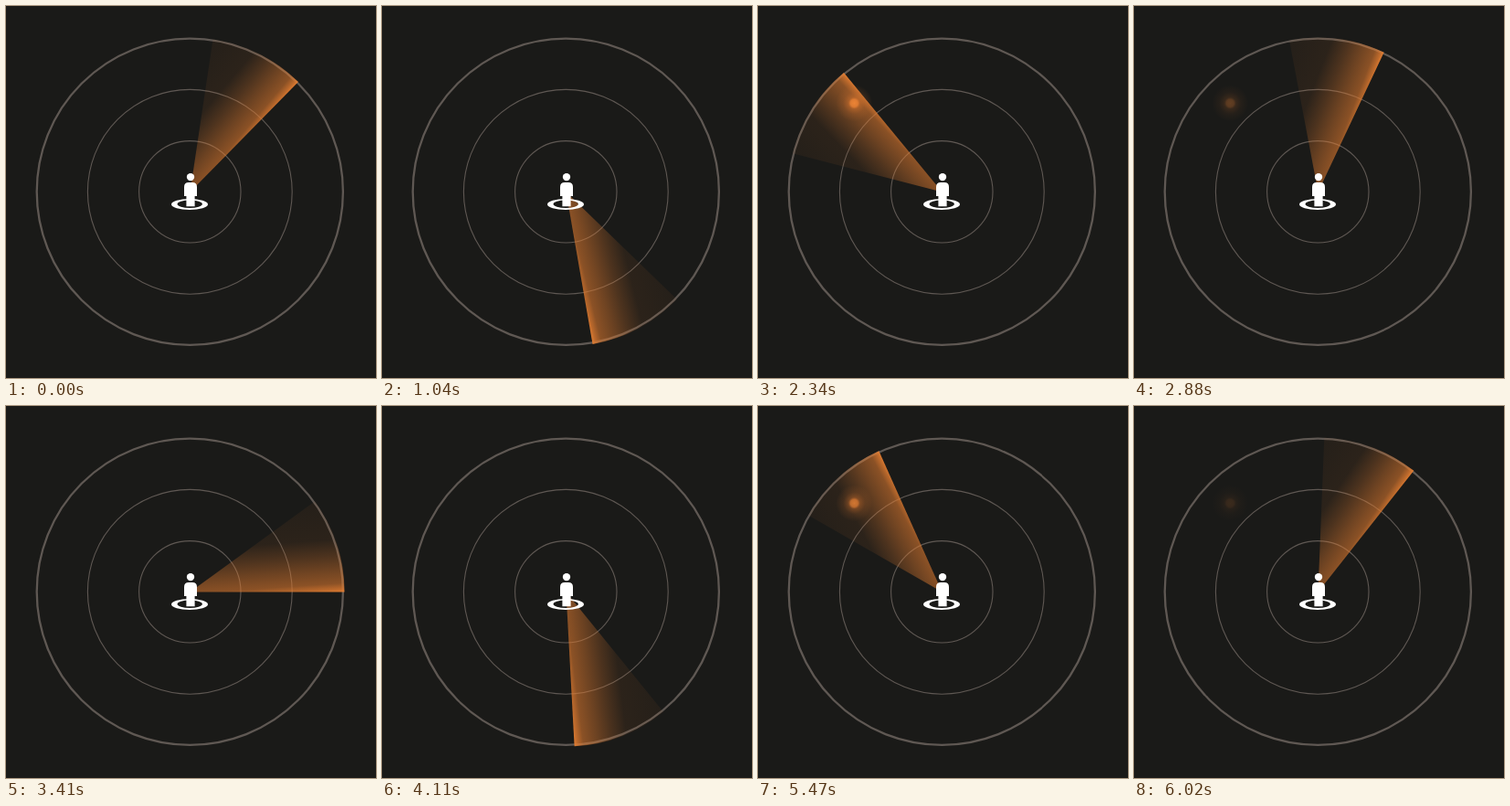
An HTML page for the animation above (6090 ms loop, 405 by 407 pixels).

```html
<!DOCTYPE html>
<html lang="en">
<head>
<meta charset="utf-8">
<title>Radar sweep</title>
<style>
  html, body { margin: 0; width: 100%; height: 100%; overflow: hidden; background: #1a1a18; }
  svg { display: block; }
</style>
</head>
<body>
<svg width="405" height="407" viewBox="0 0 405 407">
  <defs>
    <!-- runs across the wedge, tilted so the rim end of the leading edge is brightest -->
    <linearGradient id="trail" gradientUnits="userSpaceOnUse" x1="0" y1="-169" x2="-100" y2="-162">
      <stop offset="0" stop-color="#e67f32" stop-opacity=".97"/>
      <stop offset=".04" stop-color="#e07b30" stop-opacity=".8"/>
      <stop offset=".1" stop-color="#e07b30" stop-opacity=".57"/>
      <stop offset=".25" stop-color="#e07b30" stop-opacity=".42"/>
      <stop offset=".4" stop-color="#e07b30" stop-opacity=".26"/>
      <stop offset=".58" stop-color="#e07b30" stop-opacity=".09"/>
      <stop offset="1" stop-color="#e07b30" stop-opacity=".055"/>
    </linearGradient>
    <radialGradient id="glow">
      <stop offset="0" stop-color="#f08636"/>
      <stop offset=".2" stop-color="#ec8234" stop-opacity=".9"/>
      <stop offset=".32" stop-color="#e87c30" stop-opacity=".42"/>
      <stop offset=".6" stop-color="#e07830" stop-opacity=".16"/>
      <stop offset="1" stop-color="#e07830" stop-opacity="0"/>
    </radialGradient>
  </defs>
  <g fill="none" stroke="#5f5853">
    <circle cx="201.3" cy="203.3" r="167.6" stroke-width="2.3"/>
    <circle cx="201.3" cy="203.3" r="111.9" stroke-width="1.1"/>
    <circle cx="201.3" cy="203.3" r="55.7" stroke-width="1.1"/>
  </g>
  <!-- wedge of 36 degrees, leading edge pointing north -->
  <path id="sweep" d="M0 0V-169A169 169 0 0 0 -99.3 -136.7Z" fill="url(#trail)"/>
  <circle id="blip" cx="105.3" cy="106.3" r="20" fill="url(#glow)"/>
  <g fill="#fff">
    <path fill-rule="evenodd" d="M181 217a20 6 0 0 1 40 0a20 6 0 0 1-40 0zM187.5 216.8a13.7 4.2 0 0 0 27.4 0a13.7 4.2 0 0 0-27.4 0z"/>
    <circle cx="202" cy="187.1" r="4.2"/>
    <path d="M195 208V198q0-5 5-5h4q5 0 5 5v10h-2.4v11.3h-9.2V208z"/>
  </g>
</svg>
<script>
const LOOP = 6090, STEPS = 89, STEP_LEAD = 12;
const BLIP_ANGLE = 315.3, BLIP_FADE = 89; // degrees

// step and angle of the leading edge, clockwise from north; the pace varies slightly
const turns = [[0, 44.5], [15, 170.1], [34, 320.5], [50, 450], [60, 536.9], [71, 625.6], [88, 758.3]];

const sweep = document.getElementById("sweep");
const blip = document.getElementById("blip");

function angleAt(step) {
  const i = Math.max(1, turns.findIndex(([s]) => s >= step));
  const [s0, a0] = turns[i - 1], [s1, a1] = turns[i];
  return a0 + (a1 - a0) * (step - s0) / (s1 - s0);
}

function draw(ms) {
  const step = Math.floor((ms + STEP_LEAD) * STEPS / LOOP) % STEPS;
  const angle = angleAt(step);
  const sinceBlip = (angle - BLIP_ANGLE + 360) % 360;
  sweep.setAttribute("transform", `translate(201.5 203.5) rotate(${angle})`);
  blip.setAttribute("opacity", Math.max(0, 1 - sinceBlip / BLIP_FADE) ** 0.7);
}

const start = performance.now();
function tick() {
  draw(performance.now() - start);
  requestAnimationFrame(tick);
}
tick();
</script>
</body>
</html>
```
